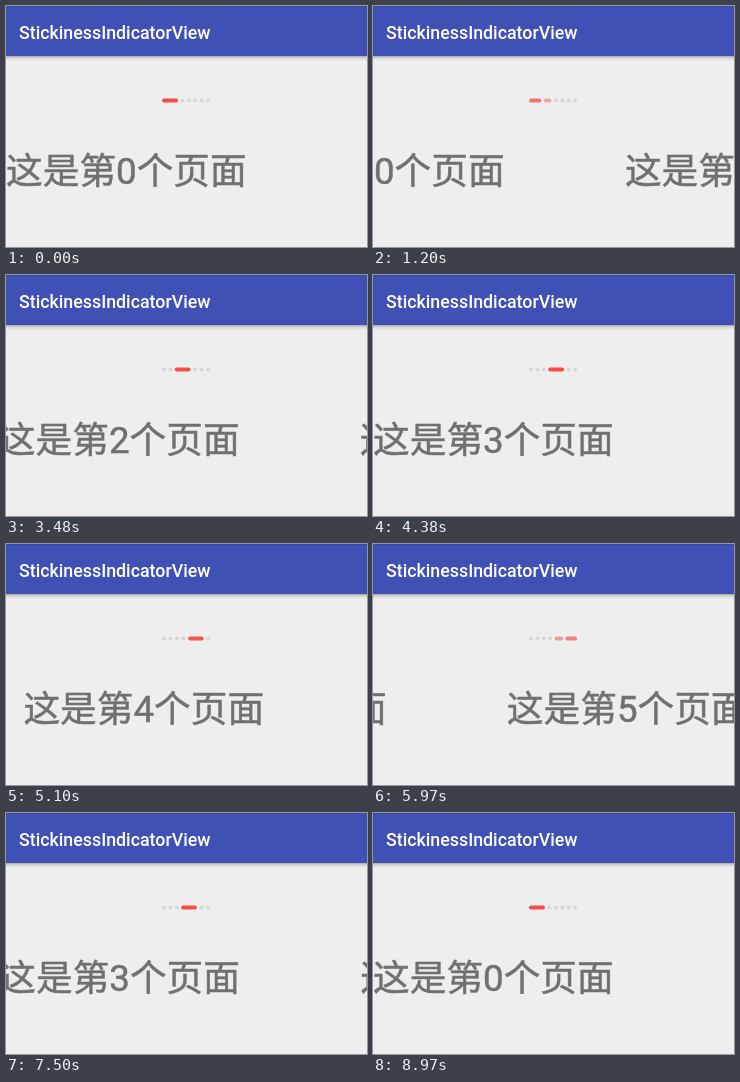
Write an HTML page that moves like this. It is 361 px wide and 241 px high and loops after 9.54 s.

```html
<!DOCTYPE html>
<html lang="zh-CN">
<head>
<meta charset="utf-8">
<title>StickinessIndicatorView</title>
<style>
html, body { margin: 0; width: 100%; height: 100%; overflow: hidden; background: #eee; }
svg { display: block; width: 361px; height: 241px; }
.title { font: 500 17.8px Roboto, sans-serif; fill: #fff; }
.page {
  font: 400 36.7px Roboto, "Noto Sans CJK SC", "Noto Sans CJK", sans-serif;
  fill: #707070; stroke: #707070; stroke-width: .5px;
}
</style>
</head>
<body>
<svg id="stage" viewBox="0 0 361 241">
  <defs>
    <linearGradient id="shadow" x2="0" y2="1">
      <stop offset="0" stop-opacity=".3"/>
      <stop offset=".4" stop-opacity=".1"/>
      <stop offset="1" stop-opacity="0"/>
    </linearGradient>
  </defs>
  <rect width="361" height="241" fill="#eee"/>
  <rect y="50" width="361" height="5" fill="url(#shadow)"/>
  <rect width="361" height="50" fill="#3f51b5"/>
  <rect width="361" height="1" fill="#3647a6"/>
  <text class="title" x="13" y="33">StickinessIndicatorView</text>
</svg>
<script>
const LOOP = 9540, STEP = 30, WIDTH = 361, PAGES = 6;
const DOT = 4, BAR = 16, GAP = 2.4, LEFT = 156;
const GREY = [216, 216, 216], RED = [247, 76, 71];

// Each swipe leads to a page; a higher pull means a slower start
const swipes = [
  { page: 1, start: 810, end: 2010, pull: 1.94 },
  { page: 2, start: 2250, end: 3330 },
  { page: 3, start: 3450, end: 4380 },
  { page: 4, start: 4440, end: 5340 },
  { page: 5, start: 5640, end: 6426 },
  { page: 4, start: 6450, end: 6990 },
  { page: 3, start: 6990, end: 7620 },
  { page: 2, start: 7770, end: 8190 },
  { page: 1, start: 8190, end: 8580 },
  { page: 0, start: 8580, end: 8970 }
];

// Drag builds up, then the page settles with a cubic ease-out
const ease = (u, pull) => 1 - (1 - u ** pull) ** 3;

function position(time) {
  let pos = 0;
  for (const { page, start, end, pull = 1.46 } of swipes) {
    const u = Math.min(1, Math.max(0, (time - start) / (end - start)));
    pos += (page - pos) * ease(u, pull);
    if (u < 1) break;
  }
  return pos;
}

const stage = document.getElementById("stage");

function add(tag, attrs) {
  const el = document.createElementNS("http://www.w3.org/2000/svg", tag);
  for (const name in attrs) el.setAttribute(name, attrs[name]);
  return stage.appendChild(el);
}

const items = Array.from({ length: PAGES }, (_, i) => {
  const text = add("text", { class: "page", y: 178 });
  text.textContent = `这是第${i}个页面`;
  return { text, mark: add("rect", { y: 92.5, height: DOT, rx: DOT / 2 }) };
});

function draw(now) {
  const pos = position(Math.floor(now % LOOP / STEP) * STEP);
  let x = LEFT;
  items.forEach(({ text, mark }, i) => {
    const on = Math.max(0, 1 - Math.abs(i - pos));
    const width = DOT + (BAR - DOT) * on;
    const color = GREY.map((c, n) => Math.round(c + (RED[n] - c) * on));
    mark.setAttribute("x", x);
    mark.setAttribute("width", width);
    mark.setAttribute("fill", `rgb(${color})`);
    text.setAttribute("x", (i - pos) * WIDTH);
    x += width + GAP;
  });
}

let start;
function tick(now) {
  start ??= now;
  draw(now - start);
  requestAnimationFrame(tick);
}
draw(0);
requestAnimationFrame(tick);
</script>
</body>
</html>
```
